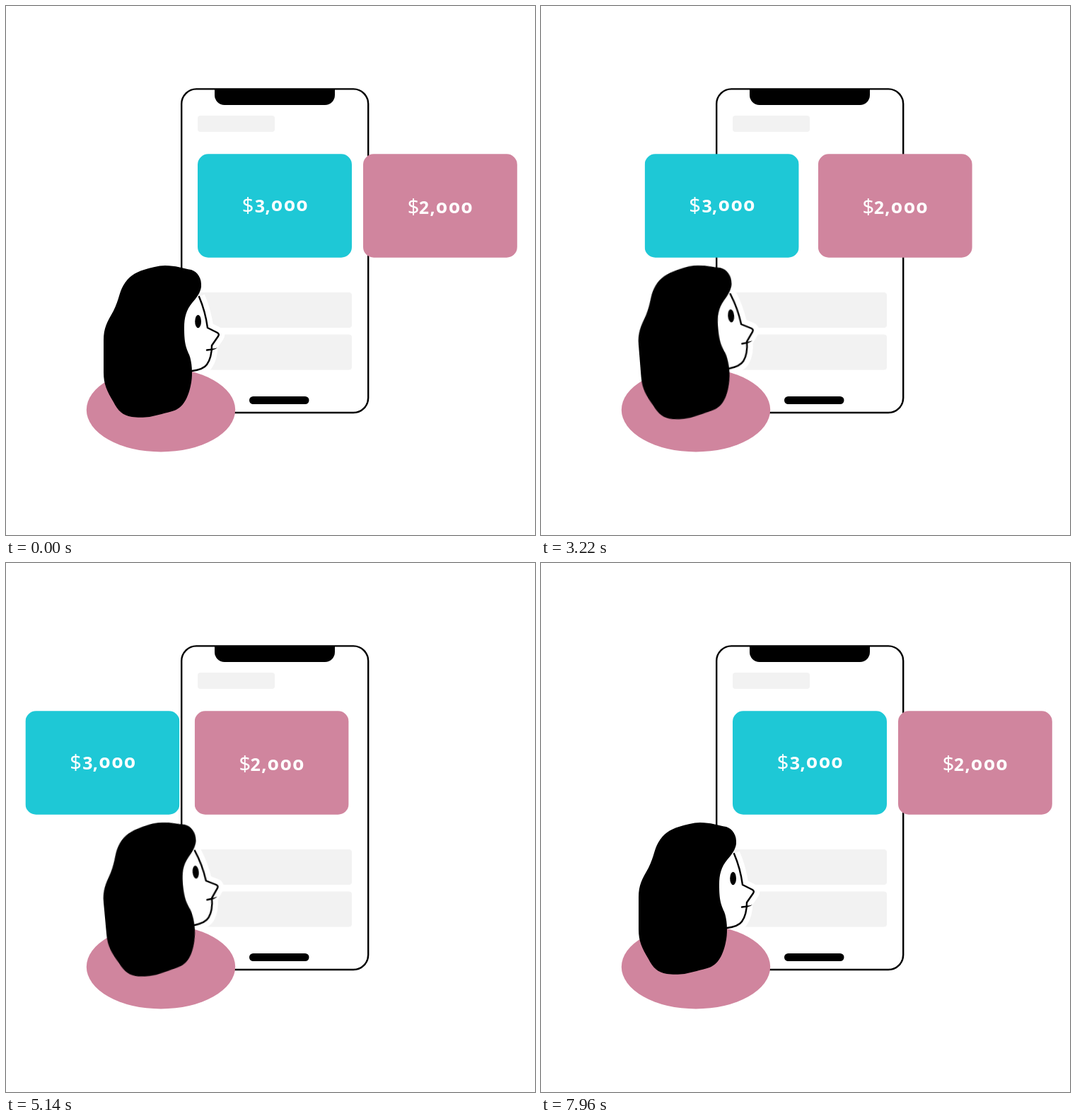
Write an HTML page that moves like this. It is 748 px wide and 748 px high and loops after 8060 ms.

```html
<!DOCTYPE html>
<html lang="en">
<head>
<meta charset="utf-8">
<title>Swiping cards</title>
<style>
  @property --turn { syntax: "<number>"; inherits: true; initial-value: 0; }

  html, body { margin: 0; width: 100%; height: 100%; overflow: hidden; background: #fff; }
  svg { display: block; width: 100vw; height: 100vh; }

  .grey { fill: #f2f2f2; }
  .teal { fill: #1ec8d6; }
  .rose { fill: #d0859e; }
  .line { fill: none; stroke: #000; stroke-width: 2.4; stroke-linecap: round; stroke-linejoin: round; }
  .halo { fill: #fff; stroke: #fff; stroke-width: 17; stroke-linejoin: round; }

  text { fill: #fff; font: 600 25px "Noto Sans", "Open Sans", sans-serif; text-anchor: middle; }
  .sign { font-size: 29px; font-weight: 500; }
  .old { font-size: 27px; font-variant-numeric: oldstyle-nums proportional-nums; }

  .first, .second, .person {
    animation: 8060ms cubic-bezier(.37, 0, .63, 1) infinite;
  }
  .first { animation-name: first; }
  .second { animation-name: second; }
  .person { animation-name: turn; }
  .head { transform-origin: 222px 476px; transform: rotate(calc(var(--turn) * -4.6deg)); }
  .look { transform: translateY(calc(var(--turn) * -4px)); }

  /* Two swipes per loop: out with overshoot, settle, rest, back. */
  @keyframes first {
    0%, 4.71%, 44.62%, 54.09%, 94.24%, 100% { transform: translateX(0); }
    10.33%, 59.71% { transform: translateX(-266px); }
    17.37%, 35.76%, 66.75%, 85.38% { transform: translateX(-230px); }
  }
  @keyframes second {
    0%, 4.71%, 49.01%, 54.09%, 98.64%, 100% { transform: translateX(0); }
    10.33%, 59.71% { transform: translateX(-247px); }
    17.37%, 35.76%, 66.75%, 85.38% { transform: translateX(-233px); }
    44.62%, 94.24% { transform: translateX(28px); }
  }
  @keyframes turn {
    0%, 7.32%, 48.26%, 56.7%, 97.89%, 100% { --turn: 0; }
    13.11%, 62.49% { --turn: 1.15; }
    20.56%, 43.3%, 69.94%, 92.93% { --turn: 1; }
  }
</style>
</head>
<body>
<svg viewBox="0 0 748 748">
  <defs>
    <path id="face" d="M273 411 C279 425 283 440 285 455 L299 462 Q302 464 300 467 L291 480 C291 490 289 500 284 507 Q279 514 263 516"/>
  </defs>

  <g id="phone">
    <rect class="line" x="248.2" y="117.4" width="264" height="457.6" rx="21"/>
    <path d="M295 117 H465 V126 A14 14 0 0 1 451 140 H309 A14 14 0 0 1 295 126 Z"/>
    <rect class="grey" x="271" y="155" width="109" height="23" rx="4"/>
    <rect class="grey" x="271" y="405" width="218" height="50" rx="4"/>
    <rect class="grey" x="271" y="464.5" width="218" height="50" rx="4"/>
    <rect x="344" y="552" width="84.5" height="11" rx="5.5"/>
  </g>

  <g class="second">
    <rect class="rose" x="505" y="209.3" width="217.8" height="146.4" rx="15"/>
    <text x="576 591 603" y="294"><tspan class="sign">$</tspan>2,<tspan class="old" x="616 634 651.5" y="293">000</tspan></text>
  </g>
  <g class="first">
    <rect class="teal" x="271" y="209.3" width="218" height="146.4" rx="15"/>
    <text x="342 359 370" y="291.5"><tspan class="sign">$</tspan>3,<tspan class="old" x="383 401 418.5" y="290">000</tspan></text>
  </g>

  <g class="person">
    <use href="#face" class="head halo"/>
    <ellipse class="rose" cx="219" cy="571" rx="105.2" ry="59.5"/>
    <g class="head">
      <use href="#face" fill="#fff"/>
      <use href="#face" class="line"/>
      <g class="look">
        <path class="line" d="M284 486.5 L291 485.6"/>
        <path d="M290 484.6 Q295 484.4 299 483.2 Q296 485.6 291 487 Z"/>
        <ellipse cx="271.6" cy="446" rx="4.4" ry="9.2"/>
      </g>
      <path d="M225 367 C240 367 250 371 262 373 C271 376 277 385 276 397
        C275 405 270 412 263 420 C255 430 252 440 252 455 C252 475 254 482 259 493
        C263 503 264 520 262 532 C259 550 252 567 238 572 C225 576 215 578 203 581
        C195 582 185 582 178 581 C165 579 158 572 152 560 C143 545 138 535 138 518
        L138 473 C138 455 143 447 152 431 C160 415 160 405 166 395
        C173 383 182 377 195 373 C205 370 215 367 225 367 Z"/>
    </g>
  </g>
</svg>
</body>
</html>
```
